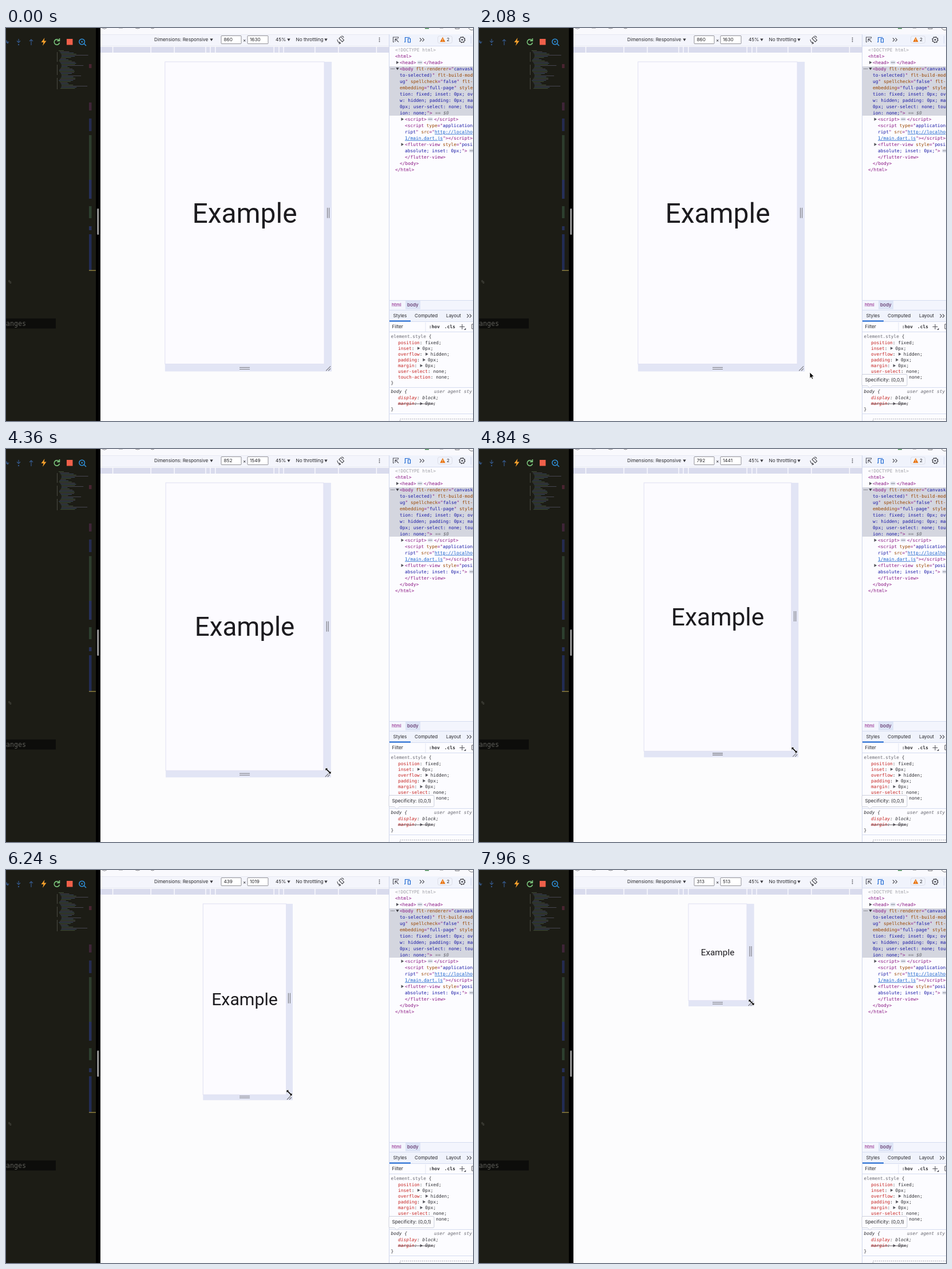
Write an HTML page that moves like this. It is 816 px wide and 686 px high and loops after 8 s.

```html
<!DOCTYPE html>
<html lang="en">
<head>
<meta charset="utf-8">
<title>Responsive text resize</title>
<style>
  html, body { margin: 0; width: 100%; height: 100%; overflow: hidden; background: #fcfcfd; }
  svg { display: block; width: 816px; height: 686px; }
  text { white-space: pre; }
  .ui { font: 8.2px Inter, "Liberation Sans", sans-serif; fill: #26262a; }
  .code { font: 7.86px "DejaVu Sans Mono", monospace; fill: #303034; }
  .it { font-style: italic; }
  .demo { font-family: Roboto, sans-serif; fill: #1c1b1f; text-anchor: middle; }
</style>
</head>
<body>
<svg id="stage" viewBox="0 0 816 686" xmlns="http://www.w3.org/2000/svg"></svg>
<script>
const LOOP = 8000, STEP = 40;
const SCALE = 0.3236, MID = 417, TOP = 59, BAND = 13;
const NS = "http://www.w3.org/2000/svg";
const stage = document.getElementById("stage");

function set(node, attrs) {
  for (const key in attrs) node.setAttribute(key, attrs[key]);
  return node;
}
function add(tag, attrs, parent = stage) {
  return parent.appendChild(set(document.createElementNS(NS, tag), attrs));
}
const rect = (x, y, width, height, fill, more) => add("rect", { x, y, width, height, fill, ...more });
const path = (d, stroke, width = 1, more) =>
  add("path", { d, stroke, "stroke-width": width, fill: "none", ...more });
const shape = (d, fill) => add("path", { d, fill });
function label(x, y, content, cls = "ui", more = {}) {
  const node = add("text", { x, y: y + 2.9, class: cls, ...more });
  node.textContent = content;
  return node;
}

// Each part starts with a one-letter colour key; parts are separated by "~".
const INK = { t: "#881280", a: "#994500", v: "#1a1aa6", g: "#a0a0a6", l: "#1a62cc",
  p: "#c5221f", k: "#303034", d: "#6a6a72" };
function code(x, y, parts, cls = "code") {
  const node = add("text", { x, y: y + 2.7, class: cls });
  for (const part of parts.split("~")) {
    const span = add("tspan", { fill: INK[part[0]] }, node);
    if (part[0] === "l") set(span, { "text-decoration": "underline" });
    span.textContent = part.slice(1);
  }
}
const arrowRight = (x, y) => shape(`M${x - 2} ${y - 2.7}l4.6 2.7l-4.6 2.7z`, "#55555c");
const arrowDown = (x, y) => shape(`M${x - 2.7} ${y - 2}h5.4l-2.7 4.4z`, "#3a3a40");
function dots(x, y) {
  rect(x, y - 3.2, 9.5, 6.4, "#dfe3ee", { rx: 3 });
  for (const dx of [2.5, 4.75, 7]) add("circle", { cx: x + dx, cy: y, r: 0.7, fill: "#55555c" });
}
const chevrons = (x, y) =>
  path(`M${x - 4} ${y - 3}l3 3l-3 3M${x + 0.5} ${y - 3}l3 3l-3 3`, "#55555c", 1.1);

function drawEditor() {
  rect(0, 0, 157, 686, "#1c1c15");
  rect(157, 0, 8, 686, "#000");
  rect(159, 315, 3.5, 46, "#8c8c8c", { rx: 1.7 });
  path("M-3 21q5 0 6 5m-3 -2l3 2.5l2 -3", "#34588a", 1.2);
  path("M22 19v6m-3 -2.5l3 3l3 -3M44 30v-10m-3 3l3 -3l3 3", "#34588a", 1.2);
  add("circle", { cx: 22, cy: 29, r: 1.2, fill: "#34588a" });
  shape("M67.5 17l-6 8h4l-1.5 6l6.5 -8.5h-4z", "#f5a02c");
  path("M92.5 21.5a4.7 4.7 0 1 0 1 4M93.5 18v4.4h-4.4", "#7cc77d", 1.6);
  rect(106, 19, 10.5, 10.5, "#f0604a");
  path("M136.5 27.5l3.5 3.5M137.5 24a4.8 4.8 0 1 1 -9.6 0a4.8 4.8 0 1 1 9.6 0", "#2f8fd8", 1.5);
  path("M131 24h3.5m-1.7 -1.7v3.4", "#2f8fd8", 1.1);

  for (let i = 0; i < 34; i++) {
    const indent = 3 + 5 * Math.abs(Math.sin(i * 0.36));
    const length = 9 + 18 * Math.abs(Math.sin(i * 2.7)) + (i % 9 === 4 ? 20 : 0);
    rect(89 + indent, 39 + i * 2, length, 0.9, ["#46563f", "#4b4a58", "#3e5068"][i % 3]);
  }
  path("M89.5 42v17M89.5 64v18M89.5 87v20", "#4a4a42");
  const marks = [[63, 7, "#4a2431"], [130, 14, "#3f2438"], [158, 22, "#242b50"],
    [187, 78, "#2d3d2d"], [265, 33, "#26305a"], [311, 21, "#2d402f"],
    [346, 7, "#26305a"], [360, 64, "#222c55"]];
  for (const [y, h, fill] of marks) rect(145, y, 4.5, h, fill);
  rect(145, 422.5, 12, 1.5, "#8a7c3c");
  label(4, 443, "%", "code it", { style: "fill:#55554e;font-size:9px" });
  rect(0, 507, 87, 17.5, "#0d0d0b");
  label(0, 517, "anges", "code", { style: "fill:#5d5d58;font-size:11.6px" });
}

function drawPageTools() {
  rect(165, 0, 651, 11, "#f9f9fd");
  path("M168 0q4 3 8 0M197 0h7M226 0q4 2 8 0M253 0q3 2 6 0", "#85858a", 1);
  rect(732, 0, 7, 1.5, "#4a8f56");
  path("M758 0h6M785 0v1.5h7v-1.5M808 0q4 5 8 3", "#77777c");
  rect(165, 11, 651, 21, "#f4f5fc");
  path("M165 11.5H816M165 31.5H816", "#e4e6f0", 0.8);
  label(259, 20.5, "Dimensions: Responsive");
  arrowDown(359, 20.5);
  for (const [x, w] of [[376, 35], [422, 36]])
    rect(x, 13.5, w, 14, "#fff", { stroke: "#85858c", "stroke-width": 0.9, rx: 1 });
  label(414, 21, "×");
  label(471, 20.5, "45%");
  arrowDown(494, 20.5);
  label(506.5, 20.5, "No throttling");
  arrowDown(559, 20.5);
  path("M582 18.2l3 -3l5.5 6l-3 3zM579 20q0 5 5 6.5m-1.5 -2.5l2 2.7l-3 1M590 17q-.5 -3 -4 -3", "#4a4a50", 1.1);
  for (const dy of [-3, 0, 3]) add("circle", { cx: 652.5, cy: 20.5 + dy, r: 0.9, fill: "#55555c" });

  rect(165, 33, 504, 10, "#d9dbed");
  for (const width of [320, 375, 425, 768, 1024, 1440])
    for (const side of [-1, 1]) rect(MID + side * width * 0.16 - 0.7, 33, 1.4, 10, "#fbfbff");
}

function drawElements() {
  rect(669, 11, 147, 675, "#fcfcff");
  rect(669, 11, 147, 20, "#f0f3fc");
  path("M669.5 11V686", "#cfd6ec");
  path("M669 31.5H816", "#d5dcf0");
  path("M678 24.5h-1.5v-8.5h9v2M680 19l6 5.5M680 19v5M680 19h5", "#55555c", 1.1);
  path("M698 24.5h-2M697.5 24v-7.5h8M702.5 18.5h4v6.5h-4z", "#1a66d2", 1.2);
  chevrons(727, 20.5);
  rect(754.5, 14, 25, 12.5, "none", { rx: 3, stroke: "#dddfe8" });
  shape("M763 15.8l4.6 8.4h-9.2z", "#e8710a");
  path("M763 18.6v2.6m0 .9v1", "#fff", 0.9);
  label(770, 20.5, "2");
  add("circle", { cx: 797, cy: 20.5, r: 4.3, fill: "none", stroke: "#4a4a50", "stroke-width": 1.3 });
  add("circle", { cx: 797, cy: 20.5, r: 5.2, fill: "none", stroke: "#4a4a50",
    "stroke-width": 1.2, "stroke-dasharray": "2 2.08" });
  add("circle", { cx: 797, cy: 20.5, r: 1.5, fill: "#4a4a50" });
  path("M812.5 14v13", "#d5dcf0");

  rect(670, 67, 146, 86, "#d4d6df");
  const row = i => 38.2 + i * 11;
  const lines = [
    [680, "g<!DOCTYPE html>"],
    [680, "t<html>"],
    [688, "t<head>"],
    [688, "t<body ~aflt-renderer~t=\"~vcanvask"],
    [688, "vto-selected)~t\" ~aflt-build-mod"],
    [688, "vug~t\" ~aspellcheck~t=\"~vfalse~t\" ~aflt-"],
    [688, "aembedding~t=\"~vfull-page~t\" ~astyle"],
    [688, "vtion: fixed; inset: 0px; ov"],
    [688, "vw: hidden; padding: 0px; ma"],
    [688, "v0px; user-select: none; tou"],
    [688, "vion: none;~t\">"],
    [697, "t<script>"],
    [697, "t<script ~atype~t=\"~vapplication"],
    [697, "vript~t\" ~asrc~t=\"~lhttp://localho"],
    [697, "l1/main.dart.js~t\"><\/script>"],
    [697, "t<flutter-view ~astyle~t=\"~vposi"],
    [697, "vabsolute; inset: 0px;~t\">"],
    [697, "t</flutter-view>"],
    [688, "t</body>"],
    [680, "t</html>"]
  ];
  lines.forEach(([x, parts], i) => code(x, row(i), parts));
  code(750, row(10), "d== $0", "code it");
  code(730, row(2), "t</head>");
  code(748, row(11), "t<\/script>");
  dots(718.5, row(2));
  dots(736.5, row(11));
  dots(809, row(16));
  arrowRight(684, row(2));
  arrowDown(684, row(3));
  arrowRight(692.5, row(11));
  arrowRight(692.5, row(15));
  for (const x of [673, 675.5, 678]) add("circle", { cx: x, cy: row(3), r: 0.7, fill: "#55555c" });
}

function drawStyles() {
  rect(670, 475, 146, 17, "#f3f5fd");
  rect(698, 476, 26, 15, "#dde4f6");
  label(674, 483.5, "html", "ui", { style: "fill:#881280" });
  label(701, 483.5, "body", "ui", { style: "fill:#4a1150" });
  rect(670, 492, 146, 20, "#f0f3fc");
  path("M669 475.5H816M669 492.5H816M669 512.5H816M669 530.5H816", "#d5dcf0");
  label(676.5, 502, "Styles");
  label(714, 502, "Computed");
  label(769, 502, "Layout");
  chevrons(809.5, 502.5);
  rect(670, 510.5, 37, 2, "#1a66d2");
  label(674.5, 521.5, "Filter");
  path("M733 514v16", "#e2e6f2");
  const bold = { style: "font-weight:bold" };
  label(739, 521.5, ":hov", "code", bold);
  label(766, 521.5, ".cls", "code", bold);
  path("M797 517v9m-4.5 -4.5h9", "#55555c", 1.1);
  shape("M800 527l3.5 0v-3.5z", "#55555c");
  path("M818 517h-4v8h4", "#55555c");

  const declare = (y, name, value, expands, cls) => {
    code(685, y, `p${name}~k: ${expands ? "  " : ""}${value};`, cls);
    if (expands) arrowRight(685 + (name.length + 2) * 4.73 + 2.8, y);
  };
  code(672.5, 538, "delement.style~k {");
  [["position", "fixed"], ["inset", "0px", 1], ["overflow", "hidden", 1], ["padding", "0px", 1],
    ["margin", "0px", 1], ["user-select", "none"], ["touch-action", "none"]]
    .forEach(([name, value, expands], i) => declare(549 + i * 10.1, name, value, expands));
  code(672.5, 619.3, "k}");
  path("M669 627.5H816M669 673.5H816", "#d5dcf0");
  code(672.5, 634, "kbody {", "code it");
  code(748, 634, "duser agent sty", "code it");
  declare(645.3, "display", "block", 0, "code it");
  declare(655.7, "margin", "0px", 1, "code it");
  path("M685 656H749", "#4a4048", 0.8);
  code(672.5, 665.3, "k}");
  path("M688.5 686V682.5H816", "#9a9aa2", 0.8, { "stroke-dasharray": "2 1.5" });
}

// time, width, height of the emulated viewport
const SIZE = [[3640, 860, 1630], [4360, 852, 1549], [5440, 718, 1305],
  [6240, 439, 1019], [7240, 370, 722], [7960, 313, 513]];
// time, x, y of the pointer
const POINTER = [[1000, 824, 692], [1320, 690, 636], [1560, 684, 634], [2080, 578, 601],
  [2700, 566, 591], [3640, 565, 588], [4360, 563, 562], [5440, 536, 480],
  [6240, 495, 389], [7240, 485, 294], [7960, 476, 231]];
const TOOLTIP_AT = 1560, GRAB_AT = 2640;

function sample(table, t) {
  if (t <= table[0][0]) return table[0].slice(1);
  const i = table.findIndex(entry => entry[0] >= t);
  if (i < 0) return table[table.length - 1].slice(1);
  const [from, to] = [table[i - 1], table[i]];
  const k = (t - from[0]) / (to[0] - from[0]);
  return from.slice(1).map((v, j) => v + (to[j + 1] - v) * k);
}

drawEditor();
drawPageTools();
const widthField = label(380.5, 20.5, "");
const heightField = label(426, 20.5, "");
const band = rect(0, TOP, 0, 0, "#e2e5f5");
const view = rect(0, TOP, 0, 0, "#fcfbff", { stroke: "#e0e0f2", "stroke-width": 1 });
const demo = add("text", { class: "demo", x: MID });
demo.textContent = "Example";
const grips = path("", "#77777d", 1.1);
drawElements();
drawStyles();

const tooltip = add("g", {});
add("path", { d: "M671 604.5h75q2 0 2 2v16q0 2 -2 2h-59l-4 4l-4 -4h-8q-2 0 -2 -2v-16q0 -2 2 -2z",
  fill: "#fcfcff", stroke: "#c9ccd8", "stroke-width": 0.9 }, tooltip);
tooltip.append(label(674.5, 614.5, "Specificity: (0,0,1)"));

const outline = { fill: "#000", stroke: "#fff", "stroke-width": 0.8 };
const arrow = add("path", { d: "M0 0v10.5l2.4 -2.2l1.6 3.7l1.8 -.8l-1.6 -3.6h3.3z", ...outline });
const resize = add("path", {
  d: "M-5 -5h5l-1.7 1.7l4.9 4.9l1.8 -1.6v5h-5l1.7 -1.7l-4.9 -4.9l-1.8 1.6z", ...outline });

function draw(t) {
  const [w, h] = sample(SIZE, t);
  // The page repaints slightly after the frame around it.
  const [pageW, pageH] = sample(SIZE, t - 30).map(v => v * SCALE);
  const right = MID + w * SCALE / 2, bottom = TOP + h * SCALE;
  const left = MID - pageW / 2;

  widthField.textContent = Math.round(w);
  heightField.textContent = Math.round(h);
  set(band, { x: left, width: right + BAND - left, height: bottom + BAND - TOP });
  set(view, { x: left, width: pageW, height: pageH });
  const size = pageH / 11;
  set(demo, { y: TOP + pageH / 2 + size * 0.355, "font-size": size });
  const gx = right + 5.4, gy = TOP + h * SCALE / 2 - 9;
  set(grips, { d: `M${gx} ${gy}v18m3 0v-18M${MID - 9} ${bottom + 6}h18m0 3h-18` +
    `M${right + 3} ${bottom + 12}l8 -8m0 4l-4 4` });

  const [x, y] = sample(POINTER, t);
  const show = on => on ? "visible" : "hidden";
  const move = `translate(${x} ${y})`;
  set(arrow, { transform: move, visibility: show(t >= POINTER[0][0] && t < GRAB_AT) });
  set(resize, { transform: move, visibility: show(t >= GRAB_AT) });
  set(tooltip, { visibility: show(t >= TOOLTIP_AT) });
}

const start = performance.now();
function tick() {
  const t = (performance.now() - start) % LOOP;
  draw(Math.floor(t / STEP) * STEP);
  requestAnimationFrame(tick);
}
tick();
</script>
</body>
</html>
```
